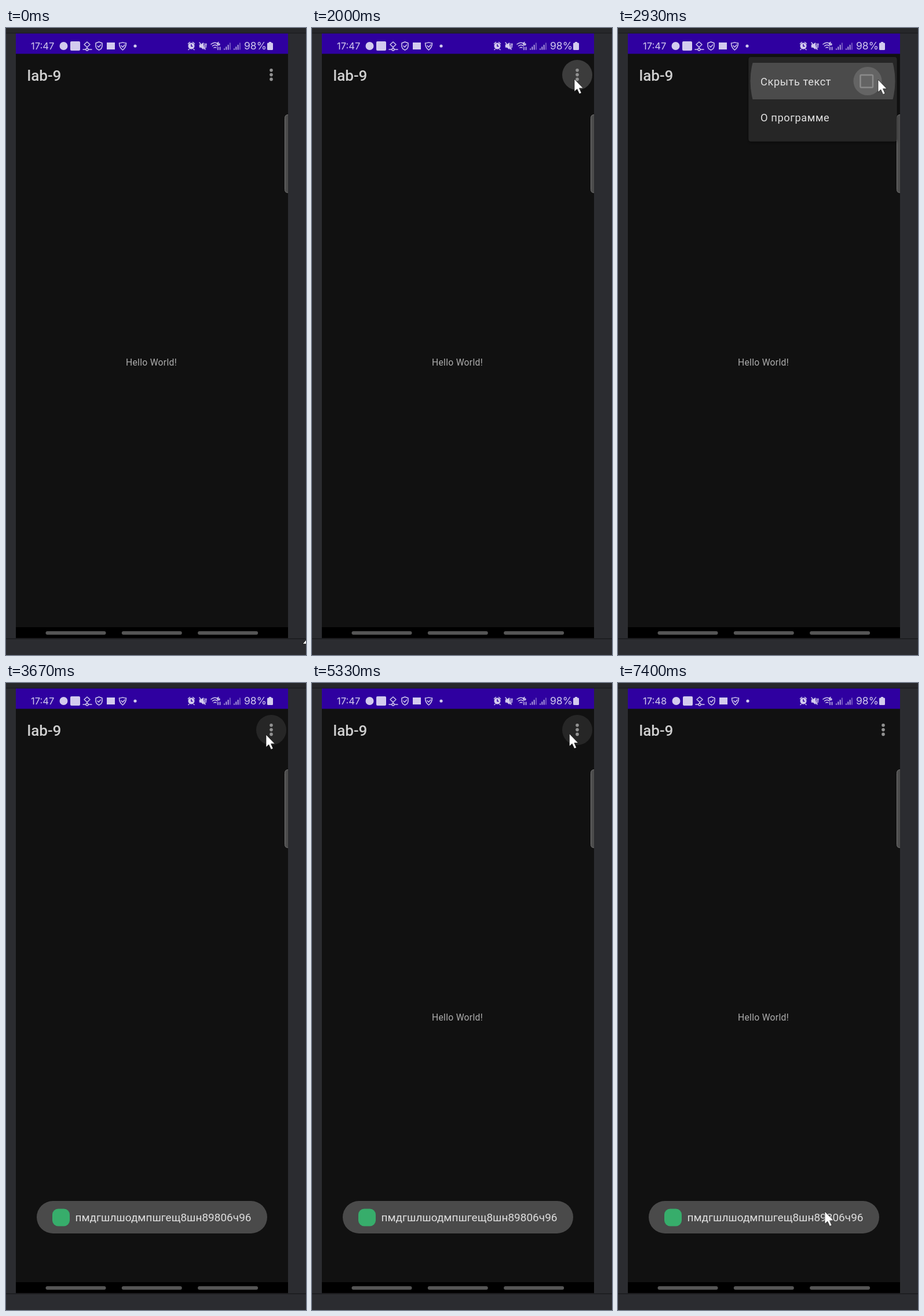
An HTML page for the animation above (8 s loop, 518 px wide and 1081 px high).

```html
<!DOCTYPE html>
<html lang="ru">
<head>
<meta charset="utf-8">
<title>lab-9</title>
<style>
html, body { margin: 0; width: 100%; height: 100%; overflow: hidden; background: #2b2c30; }
svg { display: block; width: 100%; height: 100%; font-family: Roboto, sans-serif; }
.line { fill: none; stroke: #d3cbee; stroke-width: 1.5; stroke-linecap: round; stroke-linejoin: round; }
.solid { fill: #d3cbee; }
.status { font-family: Inter, sans-serif; }
.item { font-size: 18.3px; letter-spacing: .03125em; fill: #e2e2e2; }
</style>
</head>
<body>
<svg viewBox="0 0 518 1081" preserveAspectRatio="none">
  <defs>
    <clipPath id="row"><rect x="226" y="60" width="255" height="63"/></clipPath>
    <filter id="shadow" x="-10%" y="-10%" width="120%" height="125%">
      <feDropShadow dx="0" dy="2" stdDeviation="2.5" flood-opacity=".45"/>
    </filter>
  </defs>

  <!-- window and phone screen -->
  <rect width="518" height="1081" fill="#2b2c30"/>
  <rect width="518" height="9" fill="#26272a"/>
  <rect y="8" width="518" height="1.5" fill="#1d1e20"/>
  <rect y="1052" width="518" height="2" fill="#1e1f22"/>
  <rect x="17" y="10" width="470" height="1042" fill="#111"/>
  <rect x="17" y="9.5" width="470" height="35" fill="#2f00a0"/>

  <!-- status bar -->
  <text id="clock" class="status solid" x="43" y="37" font-size="16.5">17:47</text>
  <g id="icons">
    <circle class="solid" cx="99.5" cy="31" r="7"/>
    <rect class="solid" x="111" y="23" width="17" height="16" rx="2"/>
    <g class="line">
      <path d="M140 24l5 4.5-5 4.5-5-4.5zM140 33v2M133 37h4M143 37h5"/>
      <circle cx="140" cy="37" r="2"/>
      <path d="M160.500 24l5.500 2v5c0 4-3 6-5.500 7-2.500-1-5.500-3-5.500-7v-5zM158 31l2 2 3.500-4"/>
      <path d="M195.500 26c4 0 4-1 6-1s2 1 6 1c0 6-2 9-6 12-4-3-6-6-6-12zM199 30.500l2.500 2.500 3.500-4"/>
    </g>
    <rect class="solid" x="174" y="25" width="14" height="12"/>
    <circle class="solid" cx="223" cy="31" r="2.600"/>
  </g>
  <g id="signals" class="line">
    <path d="M314.500 27l3-2.500M325.500 27l-3-2.500M316 36.500l-1 1M324 36.500l1 1"/>
    <circle class="solid" cx="320" cy="31" r="4.800"/>
    <path d="M320 28.500v3h2" stroke="#2f00a0"/>
    <path class="solid" d="M334.500 29h2.500l3.500-3v10l-3.500-3h-2.500z"/>
    <path d="M334 25l10 12M343 27q1.500 1 0 3t0 3 0 3M345.500 27q1 1 0 3t0 3"/>
    <path d="M354 28q7-5.500 13 0M356.500 31q4.500-3.500 8.500 0M359 34q2-1.500 4 0M366 33v4.500M369.500 37.500v-4.500"/>
    <path d="M367 24.500q-2 1-2 3t2 2 2-1.500-3-1"/>
  </g>
  <text class="status solid" x="411" y="37" font-size="17.500">98%</text>
  <path class="solid" d="M454 24h4v1.500h1.500q1.500 0 1.500 1.500v9.500q0 1.500-1.500 1.500h-7q-1.500 0-1.500-1.500v-9.500q0-1.500 1.500-1.500h1.500z"/>

  <!-- app bar and content -->
  <text x="36.500" y="90.500" font-size="26.100" font-weight="500" fill="#cfcfcf">lab-9</text>
  <circle id="hover" cx="458" cy="81" r="26" fill="#fff"/>
  <g id="dots" fill="#919191"></g>
  <path d="M487 149.500q-5.500 0-5.500 6v123q0 5.500 5.500 5.500" fill="#4c4c4c" stroke="#747474"/>
  <text id="hello" x="207" y="582" font-size="15.700" letter-spacing=".28" fill="#adadad">Hello World!</text>
  <rect x="17" y="1033" width="470" height="18.500" fill="#000"/>
  <g id="navigation" fill="#555"></g>

  <g id="toast">
    <rect x="53" y="893" width="398" height="56" rx="28" fill="#4a4a4a"/>
    <rect x="80" y="906.500" width="30" height="30" rx="10" fill="#37ad6b"/>
    <text x="119.500" y="928" font-size="19" fill="#dedede">пмдгшлшодмпшгещ8шн89806ч96</text>
  </g>

  <g id="tooltip">
    <rect x="402" y="122.500" width="75" height="39.500" rx="2.500" fill="#cfcfcf"/>
    <text x="421" y="150" font-size="18.300" fill="#171717">Ещё</text>
  </g>

  <g id="menu">
    <rect x="225.500" y="50" width="256" height="145.500" rx="4" fill="#282828" filter="url(#shadow)"/>
    <circle id="ripple" cx="353.500" cy="91.500" fill="#fff" clip-path="url(#row)"/>
    <circle id="boxRipple" cx="431" cy="91.500" r="24.500" fill="#fff"/>
    <text class="item" x="246" y="99">Скрыть текст</text>
    <text class="item" x="246" y="161">О программе</text>
    <rect id="unchecked" x="418.500" y="81" width="21.500" height="21.500" rx="1.500" fill="none" stroke="#8b8b8b" stroke-width="2.500"/>
    <g id="checked">
      <rect x="417" y="79.800" width="24" height="24" rx="2.500" fill="#03bfae"/>
      <path d="M421 91.300l5.500 5.500 11-11" fill="none" stroke="#282828" stroke-width="2.600"/>
    </g>
  </g>

  <path id="resize" d="M519 1054l-7 8h14z" fill="#fff" stroke="#000" stroke-width=".8"/>
  <path id="arrow" d="M0 0V21.500L4.800 17.200L8.600 25.500L12.200 24L8.500 15.800H15.200Z" fill="#fff" stroke="#000" stroke-width=".6"/>
</svg>
<script>
const LOOP = 8000;
const ui = Object.fromEntries([...document.querySelectorAll('svg [id]')].map(el => [el.id, el]));

function add(parent, tag, attributes) {
  const el = document.createElementNS('http://www.w3.org/2000/svg', tag);
  for (const name in attributes) el.setAttribute(name, attributes[name]);
  parent.append(el);
}

for (let i = 0; i < 3; i++) {
  add(ui.dots, 'circle', { cx: 458, cy: 72.8 + 7.8 * i, r: 2.8 });
  add(ui.navigation, 'rect', { x: 68.5 + 131.3 * i, y: 1040, width: 104, height: 6, rx: 3 });
}
for (const x of [377, 394]) {
  for (let i = 0; i < 4; i++) {
    const height = 1 + 3.3 * i;
    add(ui.signals, 'path', { d: `M${x + 3.3 * i} 37v${-height}`, opacity: i < 3 ? 1 : .55 });
  }
}

// Each visit presses the overflow button, then picks the first menu item.
const visits = [{ press: 1870, pick: 2800 }, { press: 4010, pick: 4735 }];
const home = { x: 505, y: 1057 };
const glides = [
  { from: 535, to: 670, x: 289, y: 1001 },
  { from: 865, to: 1130, x: 474, y: 12 },
  { from: 1200, to: 1600, x: 453, y: 88 },
  { from: 2200, to: 2600, x: 449, y: 89 },
  { from: 4000, to: 4300, x: 442, y: 89 },
  { from: 5130, to: 5800, x: 453, y: 82 },
  { from: 6550, to: 7200, x: 357, y: 911 }
];

const ramp = (t, from, to) => Math.max(0, Math.min(1, (t - from) / (to - from)));
const ease = p => p * p * (3 - 2 * p);
const pulse = (t, on, off, fade = 180) => ease(ramp(t, on, on + fade)) - ease(ramp(t, off, off + fade));
const duringVisits = fn => Math.max(...visits.map(fn));

function pointerAt(t) {
  return glides.reduce((point, glide) => {
    const p = ease(ramp(t, glide.from, glide.to));
    return { x: point.x + (glide.x - point.x) * p, y: point.y + (glide.y - point.y) * p };
  }, home);
}

const show = (el, opacity) => el.setAttribute('opacity', Number(opacity));
const place = (el, x, y) => el.setAttribute('transform', `translate(${x} ${y})`);

function draw(t) {
  const nextMinute = t >= 6390;
  ui.clock.textContent = nextMinute ? '17:48' : '17:47';
  place(ui.icons, nextMinute ? 1 : 0, 0);

  const open = duringVisits(v => pulse(t, v.press + 230, v.pick + 200));
  const pressed = duringVisits(v => pulse(t, v.press, v.press + 250, 130));
  const toggles = visits.filter(v => t >= v.pick + 270).length;

  show(ui.hover, .09 * (pulse(t, 1300, 6550) * (1 - open) + pressed));
  show(ui.hello, toggles !== 1);
  show(ui.toast, ease(ramp(t, visits[0].pick + 300, visits[0].pick + 550)));
  show(ui.tooltip, pulse(t, 5670, 6530));

  const scale = .9 + .1 * open;
  show(ui.menu, open);
  ui.menu.setAttribute('transform', `translate(481 50) scale(${scale}) translate(-481 -50)`);
  const isChecked = t > visits[1].press;
  show(ui.checked, isChecked);
  show(ui.unchecked, !isChecked);

  const since = t - visits[t < visits[1].press ? 0 : 1].pick;
  const spread = ramp(since, 0, 125);
  ui.ripple.setAttribute('r', 30 + 95 * spread);
  show(ui.ripple, .17 * spread ** 1.5);
  show(ui.boxRipple, .14 * ramp(since, 65, 130));

  const resizing = t < 70;
  show(ui.resize, resizing);
  show(ui.arrow, !resizing);
  const pointer = pointerAt(t);
  place(ui.arrow, pointer.x, pointer.y);
}

const start = performance.now();
function tick() {
  draw((performance.now() - start) % LOOP);
  requestAnimationFrame(tick);
}
tick();
</script>
</body>
</html>
```
